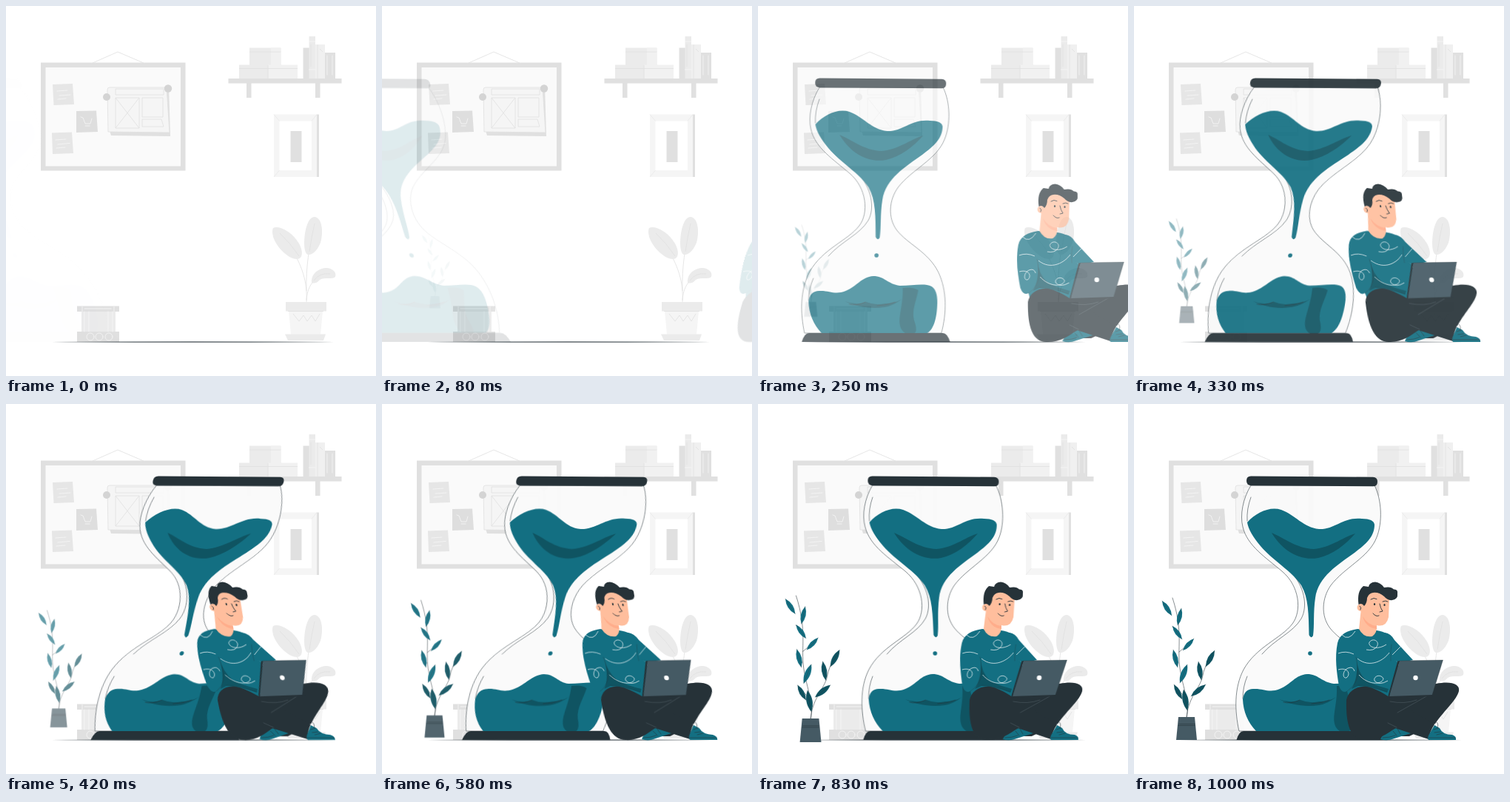
An HTML page for the animation above (1040 ms loop, 500 by 500 pixels).

```html
<!DOCTYPE html>
<html lang="en">
<head>
<meta charset="utf-8">
<title>Hourglass</title>
<style>
  html, body { margin: 0; width: 100%; height: 100%; overflow: hidden; background: #fff; }
  svg { display: block; width: 100vw; height: 100vh; }

  /* The clock is stepped by script; the motion itself lives in the keyframes. */
  .enter {
    transform-box: view-box;
    animation: 1s cubic-bezier(.36, -.01, .5, 1.38) var(--clock, 0ms) both paused;
  }
  #glass { transform-origin: 250px 276px; animation-name: from-left; }
  #man { transform-origin: 355px 347px; animation-name: from-right; }
  #plant { transform-origin: 72px 358px; animation-name: zoom; }

  @keyframes from-left {
    0% { transform: translateX(-250px) skewX(20deg); opacity: 0; }
    60% { transform: translateX(0) skewX(-10deg); opacity: 1; }
    80% { transform: translateX(0) skewX(2deg); opacity: 1; }
    100% { transform: translateX(0) skewX(0deg); opacity: 1; }
  }
  @keyframes from-right {
    0% { transform: translateX(250px) skewX(-20deg); opacity: 0; }
    60% { transform: translateX(0) skewX(10deg); opacity: 1; }
    80% { transform: translateX(0) skewX(-2deg); opacity: 1; }
    100% { transform: translateX(0) skewX(0deg); opacity: 1; }
  }
  @keyframes zoom {
    from { transform: scale(.5); opacity: 0; }
    to { transform: scale(1); opacity: 1; }
  }

  .g1 { fill: #f5f5f5; } .g2 { fill: #ebebeb; } .g3 { fill: #e0e0e0; } .g4 { fill: #d4d4d4; }
  .ink { fill: #263238; } .teal { fill: #136f82; } .deep { fill: #0f5462; }
  .slate { fill: #455a64; } .skin { fill: #ffbe9d; }
  .line { fill: none; stroke: #263238; stroke-width: .55; stroke-linecap: round; stroke-linejoin: round; }
  .pale { fill: none; stroke: #e0e0e0; stroke-width: .8; }
  .light { fill: none; stroke: #f7f7f7; stroke-width: .8; stroke-linecap: round; }
</style>
</head>
<body>
<svg viewBox="0 0 500 500">
  <g id="room">
    <!-- board -->
    <path class="pale" d="M117 77L151 62L186 77"/>
    <rect class="g3" x="47" y="76.500" width="195.500" height="146"/>
    <rect x="53.500" y="83" width="182.500" height="133.500" fill="#fafafa"/>
    <path fill="#e6e6e6" d="M63 106L90 105L92 133L64.500 134ZM62 171.500L89 170.500L91 199L63 200Z"/>
    <path fill="#dedede" d="M95 142L122 141.500L124 170L95 171Z"/>
    <path class="light" d="M69 115L83 114M72 121L87 120M70 126L81 125M67 181L81 180M70 187L86 185.500M68 192L80 191"/>
    <path class="light" stroke-width=".5" d="M101 150L104 151L107 159L114 159L116 152M107 162h6"/>
    <path class="g3" d="M140 168L220 108L222 176L142 175Z"/>
    <path class="g1" d="M137 113Q137 110 140 110L217 110L221 171L138 170Z"/>
    <path class="pale" d="M137 113Q137 110 140 110L217 110L221 171L138 170ZM148 112H213V120H148Z
      M148 124H180V165H148ZL180 165M180 124L148 165M184 124H212V150H184ZM184 153H210L213 163H184Z"/>
    <circle class="g4" cx="136" cy="123" r="5"/>
    <circle class="g4" cx="219" cy="111.500" r="5.200"/>

    <!-- shelf -->
    <path class="g3" d="M300.500 98H453.500V104.500H300.500ZM325 104H331.500V124H325ZM418 104H424.500V124H418Z"/>
    <path class="g2" d="M329 56.500H371.500V80H329ZM315 79.500H354V98H315Z"/>
    <path fill="#f1f1f1" d="M354 79.500H394V98H354ZM358 56.500H371.500V80H358Z"/>
    <path class="pale" d="M329 62H371.500M315 84.500H394M354 80V98"/>
    <path class="g3" d="M401.500 56.500H410V98H401.500Z"/>
    <path class="g2" d="M409.500 41H418V98H409.500Z"/>
    <path fill="#f0f0f0" d="M418 52H431V98H418Z"/>
    <path class="g3" d="M431 63H445V98H431Z"/>
    <path class="light" d="M409.500 48H418M409.500 86H418M434 67V93M441 67V93"/>
    <path class="pale" d="M421 52V98M424 58L428 62M412 52V82"/>

    <!-- picture -->
    <path class="g3" d="M420 146.500H423V231H420Z"/>
    <path class="g1" d="M362 146.500H420V231H362Z"/>
    <path d="M369.500 155.500H413V222H369.500Z" fill="#fff"/>
    <path class="pale" d="M362 146.500L369.500 155.500M420 146.500L413 155.500M362 231L369.500 222" opacity=".6"/>
    <path class="g3" d="M384.500 169H399.500V211H384.500Z"/>

    <!-- potted leaves -->
    <path class="pale" d="M406 400C408 368 397 345 378 314M406 385C405 352 410 325 416 298M406 398C407 380 415 366 434 362"/>
    <path class="g2" d="M361 300C368 296 386 304 396 321C402 332 401 341 394 342C383 343 366 327 361 312Q359 303 361 300Z
      M417 285C426 286 429 301 426 316C423 329 414 337 408 336C402 334 402 316 405 302C408 290 412 285 417 285Z
      M413 374C412 362 422 354 434 354C442 355 447 360 445 366C441 370 431 366 424 370Q419 376 413 374Z"/>
    <path class="pale" d="M396 338Q384 320 370 307M410 332Q413 311 417 294M416 371Q424 360 438 362"/>
    <path class="g1" d="M382 412H428L425 444H385Z"/>
    <path class="g2" d="M378 400H433V412.500H378ZM377 443.500H432L429 452H381Z"/>
    <path class="pale" d="M381 412.500H429M388 416L396 426L402 418L407 426L413 418L418 426L424 416"/>

    <!-- boxes on the floor -->
    <path class="g2" d="M102 412H148V441H102Z"/>
    <path class="g3" d="M96 405.500H153V413H96ZM96 440H153V454H96Z"/>
    <path class="light" d="M106 413V440M112 413V440M138 413V440M144 413V440M103 406V413M146 406V413M106 409H142"/>
    <g class="light"><circle cx="114" cy="447" r="5"/><circle cx="126" cy="447" r="5"/><circle cx="139" cy="447" r="5"/></g>

    <path class="ink" opacity=".75" d="M61 454Q140 453.200 252 453.200T444 454Q360 454.800 252 454.800T61 454Z"/>
  </g>

  <g id="plant" class="enter">
    <path class="line" d="M71 424C76 404 66 384 62 357C58 330 67 308 52 262M71 424C73 398 86 388 92 371Q95 352 108 335
      M59 308L52 301M61 335Q65 332 70 327M64 368L70 356M67 394L58 384M60 350L54 337M60 297L62 283"/>
    <g id="leaves"></g>
    <path class="slate" d="M60 423H82L85 454H57Z"/>
    <path class="line" d="M61 432.500H82M60 434.500H82"/>
  </g>

  <g id="glass" class="enter">
    <path fill="#fafafa" fill-opacity=".94" stroke="#263238" stroke-width=".55"
      d="M158 110C147 128 143 150 147 166C153 192 179 208 200 226C224 246 227 280 214 297C199 317 165 328 148 359
      C135 384 136 415 142 442H327C334 415 334 385 322 360C308 332 280 322 265 303C252 286 254 262 266 245
      C284 221 318 207 328 180C336 160 335 130 325 110Z"/>
    <path class="line" d="M158 126Q152 142 153 158M211 226C231 246 235 274 226 290C215 309 190 318 173 338M153 368Q147 382 147 398"/>
    <path class="teal" d="M153 160C165 147 183 138 199 143C218 150 229 167 250 169C271 170 283 152 308 155
      Q324 155 325 163C325 179 314 189 298 201C276 217 249 233 245 262C242 282 244 299 242 313Q239 318 236.500 312
      C236 285 236 262 226 245C215 227 188 212 171 192Q155 173 153 160Z"/>
    <path class="deep" d="M186 174C203 181 219 195 243 196C266 194 280 181 299 175C286 190 268 204 249 208C222 213 198 195 186 174Z"/>
    <circle class="teal" cx="238" cy="337" r="2.800"/>
    <path class="teal" d="M147 399Q149 385 161 385C175 384 182 391 197 385C212 379 218 366 234 365
      C249 365 254 376 270 378C288 378 303 374 313 379Q321 384 321 401C321 420 317 437 308 442H165Q148 424 147 399Z"/>
    <path class="deep" d="M196 399Q211 405 225 400Q237 405 251 402Q264 402 273 396Q262 405 250 407C230 410 211 406 196 399Z"/>
    <path class="deep" d="M274 381Q287 379 295 384C293 398 286 411 290 425Q296 441 289 443Q279 446 273 437C266 423 275 410 274 381Z"/>
    <path class="line" d="M202 403Q211 406 224 400M240 405Q252 405 264 400"/>
    <path class="ink" d="M158 97.500L323 98.800Q329 99 329 105Q329 111.300 323 111.300L158 110.200Q152 109.500 152 103.800Q152 97.500 158 97.500Z"/>
    <path class="ink" d="M148 442H329Q335 442 339 454H138.500Q142 442 148 442Z"/>
  </g>

  <g id="man" class="enter">
    <!-- far arm and torso -->
    <path class="teal" d="M339 309Q347 310 352 319L377 346L359 350L345 343Z"/>
    <path class="teal" d="M302 304C288 306 278 311 275 323C271 343 274 363 277 381Q281 392 288 388L291 400H349L358 350
      L347 342Q350 328 348 317Q345 309 328 306Z"/>
    <path class="deep" d="M301 345Q302 362 313 373Q324 380 344 385L342 390Q318 380 303 381L294 385Q303 370 301 345Z"/>
    <path class="line" opacity=".55" d="M300 342Q304 362 301 372Q296 383 288 388M303 380Q320 382 342 389M348 325Q346 336 347 347"/>
    <path fill="none" stroke="#fff" stroke-width=".7" d="M281 312Q290 321 299 307M276 337Q286 333 297 338M302 344C319 358 338 346 345 336
      M341 325C329 333 316 329 318 322C323 315 333 321 328 328Q324 334 314 332M349 339Q354 334 360 328
      M276 359C290 355 293 366 287 370C281 371 282 360 289 357Q296 354 298 361
      M304 366C317 381 336 379 337 371C333 364 323 368 325 374Q331 381 343 374"/>

    <!-- head -->
    <path class="skin" d="M307 276L304 304Q310 316 322 314Q329 309 328 299Q341 302 344 288L345 264Q338 248 314 252Z"/>
    <path fill="#ff9c7a" opacity=".5" d="M309 287Q316 299 328 300L328 304Q313 302 309 287Z"/>
    <circle class="skin" cx="306.500" cy="275" r="5"/>
    <path class="ink" d="M303.500 271Q301 253 310 246L317 247Q318 241 326 240.500Q333 241 338 248Q347 246 351 250.500
      Q357 250 356 256.500Q357 264 349 265Q343 266 338 260Q331 254 323 255Q317 256 315 262Q315 269 311 273Q308 268 303.500 271Z"/>
    <ellipse class="ink" cx="325" cy="270.500" rx="1.100" ry="1.600"/>
    <ellipse class="ink" cx="338.500" cy="271.500" rx="1.100" ry="1.600"/>
    <path class="line" style="stroke-width:.9" d="M320 264Q324 261 328 263.500M336 267Q340 265 343 267M332 270Q333 276 336 280L332 281M323 283Q327 288 331 286M305 273Q308 275 306 278"/>

    <!-- legs and shoes -->
    <path class="ink" d="M340 396C360 388 389 381 408 378C428 374 441 378 439 388C436 400 421 412 407 432L372 449L338 449Z"/>
    <path class="teal" d="M333 453Q335 447 344 443L358 436L377 444L352 452Q342 456 333 453Z"/>
    <path class="ink" d="M287 400C289 389 300 380 315 382C331 385 347 398 363 407L406 433Q400 442 398 453L353 438
      C342 446 328 455 311 454C293 454 286 434 287 400Z"/>
    <path class="line" style="stroke:#617077" opacity=".75" d="M343 431L355 437M356 417L397 394M346 402Q366 406 382 400"/>
    <path class="teal" d="M406 434L413 438Q417 447 430 447Q436 449 435 454H398Q396 451 399 446Z"/>
    <path class="line" d="M398 451H434M336 451Q345 451 353 448M405 440L411 438M406 444L414 443M409 447L417 445
      M410 438Q412 432 409 430M350 442L355 448M356 439L360 446"/>

    <!-- laptop -->
    <path class="ink" d="M345 393L403 391L407 394L402 395.500H345Z"/>
    <path class="slate" d="M359 347L417.500 346L403 393L345 395Z"/>
    <path class="ink" d="M356 348.500Q356 347 359 347L345 395L343.500 394Z"/>
    <path class="line" opacity=".55" d="M359 347L417.500 346L403 393"/>
    <circle cx="380.500" cy="370" r="3.200" fill="#fff"/>
  </g>
</svg>
<script>
  // Each leaf: tip x, tip y, base x, base y. The lower and right ones lie in shade.
  const lit = [
    [38, 266, 51, 286], [64, 276, 59, 299], [52, 300, 65, 318],
    [81, 317, 66, 333], [53, 332, 59, 356], [72, 352, 62, 377]
  ];
  const shaded = [
    [54, 379, 65, 399], [67, 386, 72, 414], [97, 379, 77, 395],
    [87, 348, 91, 373], [109, 333, 97, 355]
  ];
  const leaf = tone => ([x, y, u, v]) => {
    const mx = (x + u) / 2, my = (y + v) / 2;
    const nx = (v - y) * .28, ny = (x - u) * .28;
    return `<path class="${tone}" d="M${x} ${y}Q${mx + nx} ${my + ny} ${u} ${v}Q${mx - nx} ${my - ny} ${x} ${y}Z"/>
      <path class="line" style="stroke-width:.3" d="M${x} ${y}L${u} ${v}"/>`;
  };
  document.getElementById('leaves').innerHTML =
    [...lit.map(leaf('teal')), ...shaded.map(leaf('deep'))].join('');

  const LOOP = 1040, STEP = 1000 / 24, LEAD = 34;
  const stage = document.documentElement;

  function tick() {
    const t = performance.now() % LOOP;
    const step = Math.min(24, Math.floor((t + 5) / STEP));
    const at = (step < 2 ? 0 : step * STEP) + LEAD;
    stage.style.setProperty('--clock', -at + 'ms');
    requestAnimationFrame(tick);
  }
  tick();
</script>
</body>
</html>
```
